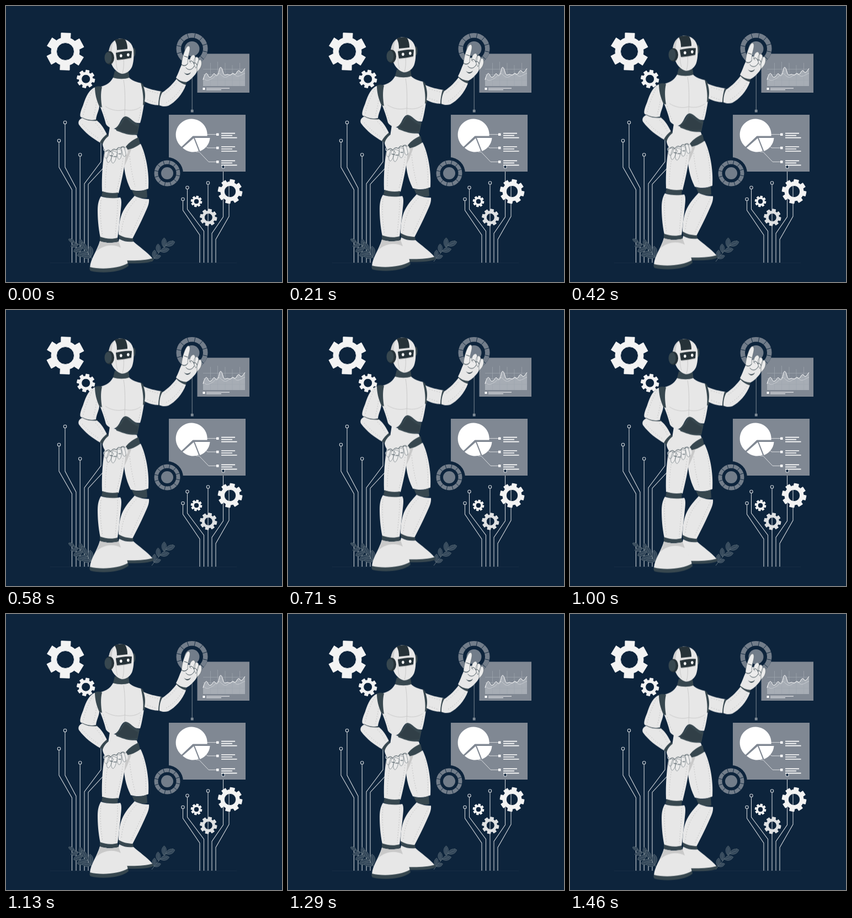
An HTML page for the animation above (1.5 s loop, 500x500 px).

```html
<!DOCTYPE html>
<html lang="en">
<head>
<meta charset="utf-8">
<title>Robot</title>
<style>
html, body { margin: 0; width: 100%; height: 100%; overflow: hidden; background: #0d243c; }
svg { display: block; width: 100vw; height: 100vh; }
#robot { animation: float 1.5s linear infinite; }
@keyframes float { 50% { transform: translateY(-10px); } }
.wire { fill: none; stroke: #cdd2d7; stroke-width: 1.1; }
.node { fill: #0d243c; stroke: #cdd2d7; stroke-width: 1.1; }
.panel { fill: #808893; }
.white { fill: #fff; }
.thin { fill: none; stroke: #fff; stroke-width: .7; }
.body { fill: #e7e7e7; }
.shade { fill: #c9c9c9; }
.dark { fill: #37474f; }
.deep { fill: #263238; }
.seam { fill: none; stroke: #bdbdbd; stroke-width: .7; }
.dots { fill: none; stroke: #b3b3b3; stroke-width: .8; stroke-dasharray: 1.6 3; }
.crease { fill: none; stroke: #37474f; stroke-width: 1; stroke-linecap: round; }
.finger { fill: #ececec; stroke: #56646b; stroke-width: .6; stroke-linejoin: round; }
.leaf { fill: #33475a; stroke: #65757f; stroke-width: .6; }
.stem { fill: none; stroke: #65757f; stroke-width: .9; }
</style>
</head>
<body>
<svg viewBox="0 0 500 500">
  <path d="M80 465.3H418" stroke="#1b3148" stroke-width=".8"/>

  <g class="wire">
    <path d="M96 244V292L119.5 333V465M107 211V292L127 330V465M134.200 270V465M142 465V322L172 282V236M149 465V323L179.500 290V262"/>
    <path d="M320.500 350V370L351 415V465M328.500 329V368L358.500 408V465M366 320V465M393.500 292V382L373 412V465M404 321V381L380 423V465"/>
  </g>

  <g id="dials-back"></g>
  <path d="M337.200 106V190" stroke="#7f8a95"/>
  <rect x="334.800" y="187.800" width="4.800" height="4.800" fill="#7f8a95"/>

  <rect class="panel" x="346.500" y="86.500" width="94.500" height="70.500"/>
  <g id="chart">
    <path d="M357 134C360 122 363 120 365 124S369 131 372 128S376 120 379 124S384 127 386 117S391 111 393 119S397 125 400 124S406 127 409 123S414 127 417 122S421 115 424 119S429 118 433 113V145H357Z" fill="#a7adb5"/>
    <path d="M357 114.500H433M357 124.500H433M357 134.500H433M370.500 103V145M383.500 101V145M397 103V145M410 107V145M423.500 103V145" stroke="#a0a7af" stroke-width=".7"/>
    <path class="thin" d="M357 134C360 122 363 120 365 124S369 131 372 128S376 120 379 124S384 127 386 117S391 111 393 119S397 125 400 124S406 127 409 123S414 127 417 122S421 115 424 119S429 118 433 113" style="stroke-width:1"/>
    <path class="thin" d="M357 130C364 139 369 133 374 131S382 120 387 123S395 132 401 128S411 122 416 126S426 124 433 122" opacity=".5"/>
    <rect class="white" x="356.500" y="148" width="4" height="4"/>
    <path class="thin" d="M363 149H405M363 151.700H390" style="stroke-width:1.100"/>
  </g>

  <rect class="panel" x="295" y="197" width="139" height="103"/>
  <g id="pie">
    <path class="white" d="M338.500 235.500L318 255A28.500 28.500 0 1 1 364.500 235.500Z"/>
    <path class="white" d="M340 239.500L320 257A28 28 0 0 0 349 262.500Z"/>
    <path class="white" d="M342 239H369.500A28 28 0 0 1 351.500 263Z"/>
    <path class="thin" d="M360 232.700H382M362 254L365 257H382M344 264L350 264.500L367 282.300H382"/>
    <g id="legend"></g>
  </g>
  <circle class="node" cx="393.500" cy="291.500" r="2.700"/>
  <g id="nodes" class="node"></g>
  <g id="dials"></g>
  <g id="gears"></g>
  <g id="plants"></g>

  <g id="robot">
    <!-- far leg -->
    <path class="body" d="M218 258C228 256 237 252 244 250C253 268 260 301 258 331C248 336 236 336 226 333C217 315 212 294 214 270Z"/>
    <path class="shade" d="M212 258L228 256C224 270 219 281 214 291Z"/>
    <path class="dots" d="M224 272C226 294 230 312 234 327M248 266C253 288 254 308 253 326"/>
    <path class="dark" d="M228 334C238 337 248 336 255 332L256 347C248 350 239 347 232 343Z"/>
    <path class="body" d="M233 344C242 349 252 350 259 350C260 358 256 366 251 377C244 393 236 408 229 422C220 422 211 419 204 415C204 398 206 384 212 372C218 360 226 352 233 344Z"/>
    <path class="dots" d="M236 351C221 365 211 386 209 411M254 355C244 376 235 396 226 416"/>
    <path class="dark" d="M204 414C212 419 221 421 230 421L231 427C221 428 212 426 205 421Z"/>
    <path class="body" d="M205 422C214 427 222 428 231 427C241 436 256 446 266 458C253 463 232 464 215 463L201 440Z"/>
    <path class="dark" d="M266 457C268 460 267 462 264 463C251 467 234 467 216 466L214 461C233 462 253 461 266 457Z"/>

    <!-- pelvis and near leg -->
    <path class="body" d="M188 219C201 225 219 231 237 234L242 249C236 259 222 260 216 262L182 258Z"/>
    <path class="dark" d="M217 255C223 247 231 242 240 238L243 250C236 256 226 260 216 261Z"/>
    <path class="body" d="M181 250C191 259 207 262 217 260C217 282 211 312 204 339C193 341 183 339 174 336C173 310 175 278 181 250Z"/>
    <path class="dots" d="M185 277C181 298 180 314 180 330M212 276C209 300 205 319 201 333"/>
    <path class="dark" d="M175 336C184 339 194 340 203 338L202 349C192 350 181 348 173 344Z"/>
    <path class="body" d="M172 345C183 349 197 349 207 347C211 352 208 366 207 379C205 395 204 408 202 421C191 424 181 423 171 420C167 401 166 383 166 370C166 359 168 351 172 345Z"/>
    <path class="dots" d="M202 352C203 373 199 397 198 417M172 352C170 374 172 397 175 416"/>
    <path class="dark" d="M170 418C181 422 192 423 202 420L204 427C192 430 180 429 170 426Z"/>
    <path class="body" d="M170 426C181 430 193 430 204 427C208 440 219 454 221 468C202 480 168 480 152 474C153 458 165 444 170 426Z"/>
    <path class="shade" d="M170 426C181 430 193 430 204 427L208 438C192 430 176 434 163 445C167 438 169 432 170 426Z"/>
    <path class="dark" d="M152 473C172 478 204 476 221 466L222 471C206 484 171 485 153 480C151 478 151 475 152 473Z"/>

    <!-- torso -->
    <path class="dark" d="M198 220C207 216 210 202 217 199C225 202 230 211 242 214L238 233C224 236 211 230 200 226Z"/>
    <path class="deep" d="M201 222C211 216 212 206 217 203C224 209 230 215 239 219L238 229C225 233 212 229 201 222Z" opacity=".35"/>
    <path class="dark" d="M197 118H222L224 133C214 137 202 137 193 134Z"/>
    <path class="body" d="M194 130C204 133 215 133 223 130C229 136 237 138 245 140C248 154 252 169 249 184C247 196 245 206 243 212C230 214 227 201 216 200C207 203 207 217 197 222C191 223 184 219 181 214C178 202 174 191 170 181C166 169 165 157 166 147C178 146 188 141 194 130Z"/>
    <path class="seam" d="M213 134C216 151 216 172 215 199M180 182C192 190 205 191 215 188C227 191 237 188 244 183"/>
    <path class="dots" d="M176 187C179 198 182 207 186 214M244 188C243 198 241 205 239 209"/>

    <!-- head -->
    <ellipse class="dark" cx="231.500" cy="84" rx="3" ry="8"/>
    <path class="body" d="M186 84C188 67 197 59.500 208 59.500C221 60 229 68 231 80C232 94 231 103 228 111C224 119 217 123 210 123C201 121 194 113 191 105Z"/>
    <path class="shade" d="M186 84C188 67 197 59.500 208 59.500L197 63C191 69 191 80 194 106L191 105Z" opacity=".8"/>
    <path class="deep" d="M197 62C203 59 211 59 216 61C219 66 220 72 220 78L201 80C201 73 200 67 197 62Z"/>
    <path class="seam" d="M201 81C198 90 199 107 202 116M213 97C214 106 213 115 211 122M202 99L227 95"/>
    <path class="deep" d="M199 85C208 83 218 81 228 82L227 94C219 96 210 97 201 98Z"/>
    <ellipse class="white" cx="208.300" cy="90.300" rx="2.300" ry="2.800"/>
    <ellipse class="white" cx="221.300" cy="88.600" rx="2.300" ry="2.800"/>
    <ellipse class="deep" cx="187.500" cy="94" rx="8.500" ry="12"/>
    <ellipse class="dark" cx="185" cy="94" rx="6.500" ry="10.500"/>

    <!-- lowered arm -->
    <path class="body" d="M163 147C151 150 145 164 140 179C136 189 133 197 135 201C144 207 154 208 163 206C164 195 170 188 169 178C165 165 163 156 163 147Z"/>
    <path class="dots" d="M157 153C149 168 143 184 140 198M164 174C162 187 160 195 158 202"/>
    <path class="dark" d="M161 147C165 145 170 145 174 147C171 158 172 172 174 184L169 182C164 171 161 159 161 147Z"/>
    <path class="dark" d="M138 202C147 207 157 208 165 206L166 210L138 206Z"/>
    <path class="body" d="M138 203C147 208 157 209 165 208C173 214 178 223 183 233C178 237 174 242 171 248C157 240 143 230 132 215C130 210 132 206 138 203Z"/>
    <path class="dots" d="M138 214C148 225 157 233 168 240M162 212C169 219 174 227 177 234"/>
    <path class="dark" d="M170 247C173 241 178 236 183 232L186 236C181 240 177 245 175 251Z"/>
    <path class="body" d="M175 251C177 244 181 239 187 235C197 239 207 246 214 253C223 259 222 267 218 270L190 271C181 266 176 259 175 251Z"/>
    <path class="finger" d="M181 262C176 269 178 276 182 276C186 274 186 268 188 265ZM187 263C182 271 181 282 185 284C190 282 191 273 195 268ZM194 262C190 270 189 284 194 285C199 282 199 274 202 266ZM202 259C201 268 201 277 205 278C210 276 209 268 209 261ZM208 255C211 263 210 272 215 273C219 271 216 263 214 257Z"/>
    <path class="crease" d="M181 264Q185 258 190 264Q194 257 200 261Q203 254 208 258Q211 252 216 257M188 271L193 272M195 273L200 273M204 268L208 268"/>

    <!-- raised arm -->
    <path class="dark" d="M244 139C249 142 250 145 250 147C254 157 254 167 252 177L248 180C250 165 247 151 244 139Z"/>
    <path class="body" d="M249 146C260 151 270 153 282 155C279 164 277 173 278 180C267 180 258 177 251 173C253 163 252 154 249 146Z"/>
    <path class="dots" d="M256 153L277 159M256 170L273 176"/>
    <path class="dark" d="M280 155L285 156C281 164 279 173 280 181L276 180C276 171 278 162 280 155Z"/>
    <path class="body" d="M283 157C295 149 303 140 310 131C315 137 320 140 326 143C320 160 306 175 294 181C288 183 282 182 278 180C278 172 279 164 283 157Z"/>
    <path class="dots" d="M287 160C297 153 304 146 310 138M320 145C311 160 301 169 289 176"/>
    <path class="dark" d="M308 131L311 127C316 133 321 136 327 138L326 143C319 141 312 137 308 131Z"/>
    <path class="body" d="M308 130C312 123 314 115 318 107C318 102 321 99 325 97L343 96C350 104 349 116 343 124C338 130 333 135 327 138C320 138 313 135 308 130Z"/>
    <path class="finger" d="M318 106C319 94 324 77 329 73C334 71 334 78 332 85C330 92 329 99 329 105C326 109 320 110 318 106Z"/>
    <path class="finger" d="M333 101C332 94 337 87 341 89C345 93 342 102 340 109ZM340 104C340 95 344 90 348 94C351 98 347 108 344 113ZM346 107C347 98 352 95 354 100C356 108 351 116 346 119Z"/>
    <path class="finger" d="M328 106C334 101 342 105 341 110C339 116 331 118 326 114Z" style="stroke:none"/>
    <path class="crease" d="M318 106Q323 111 329 105M323 91L329 93M326 112C330 117 337 117 341 109"/>
    <path class="dark" d="M322 120C325 124 331 124 335 120C333 125 327 128 322 120Z"/>
    <path class="crease" d="M333 101Q337 97 340 104Q343 101 346 107"/>
  </g>
</svg>
<script>
const $ = id => document.getElementById(id);
const BG = '#0d243c';

function polar(r, a) {
  return `${(r * Math.cos(a)).toFixed(2)} ${(r * Math.sin(a)).toFixed(2)}`;
}

function gear(x, y, R, body, hole, n, turn, fill) {
  const step = Math.PI * 2 / n;
  let d = '';
  for (let i = 0; i < n; i++) {
    const a = turn + i * step;
    d += `${i ? 'L' : 'M'}${polar(body, a - step * .32)}L${polar(R, a - step * .24)}` +
      `L${polar(R, a + step * .24)}L${polar(body, a + step * .32)}` +
      `A${body} ${body} 0 0 1 ${polar(body, a + step * .68)}`;
  }
  d += `ZM${hole} 0A${hole} ${hole} 0 1 0 ${-hole} 0A${hole} ${hole} 0 1 0 ${hole} 0Z`;
  return `<path transform="translate(${x} ${y})" d="${d}" fill="${fill}" fill-rule="evenodd"
    stroke="${fill}" stroke-linejoin="round"/>`;
}

function dial(x, y, outer, inner, core, halo) {
  const mid = (outer + inner) / 2;
  let ticks = '';
  for (let i = 0; i < 12; i++) {
    const a = (i + .4) * Math.PI / 6;
    ticks += `M${polar(inner, a)}L${polar(outer, a)}`;
  }
  return `<g transform="translate(${x} ${y})"><circle r="${halo}" fill="${BG}"/>
    <circle r="${mid}" fill="none" stroke="#727d8a" stroke-width="${outer - inner}"/>
    <path d="${ticks}" stroke="${BG}" stroke-width=".9"/>
    <circle r="${core}" fill="#727d8a"/></g>`;
}

function leaf(x, y, turn, len) {
  const w = len * .32;
  return `<g transform="translate(${x} ${y}) rotate(${turn})">
    <path class="leaf" d="M0 0C${len * .3} ${-w} ${len * .75} ${-w} ${len} 0C${len * .75} ${w} ${len * .3} ${w} 0 0Z"/>
    <path class="stem" d="M0 0H${len * .8}" style="stroke-width:.5"/></g>`;
}

$('gears').innerHTML =
  gear(107.5, 82.5, 34.5, 25.5, 16, 6, -1.54, '#f3f3f3') +
  gear(144.7, 132.2, 16.3, 12.3, 8, 8, .2, '#f3f3f3') +
  gear(406, 336, 22, 17, 10.7, 8, .2, '#f3f3f3') +
  gear(345, 354, 10, 7.3, 4.8, 8, .2, '#f3f3f3') +
  gear(366.8, 383, 15.3, 11.6, 7.5, 8, .2, '#dfe1e3');

$('dials').innerHTML =
  dial(337, 77.5, 28.5, 20, 13.5, 28.5) +
  dial(292, 303, 23.5, 16.5, 11, 29);

$('nodes').innerHTML = [[96, 244], [107, 211], [134.2, 269.5], [179.5, 259.5],
  [320.5, 350], [328.5, 329], [366, 320.5], [404, 321]]
  .map(([x, y]) => `<circle cx="${x}" cy="${y}" r="2.700"/>`).join('');

$('legend').innerHTML = [232.7, 257, 282.3].map(y =>
  `<rect class="white" x="381" y="${y - 2.2}" width="4.500" height="4.500"/>
   <path d="M390 ${y - 2}H415M390 ${y + 2}H410M390 ${y + 6}H418.500" stroke="#fff" stroke-width="1.700"/>`).join('');

$('plants').innerHTML =
  '<path class="stem" d="M156 459C149 442 136 431 117 426M264 463C275 448 287 435 303 425"/>' +
  [[124, 428, 208, 12], [131, 432, 165, 14], [138, 436, 255, 14], [139, 438, 158, 18],
   [146, 443, 240, 17], [148, 446, 162, 20], [154, 454, 265, 19], [154, 455, 188, 16],
   [289, 434, -22, 18], [286, 437, -88, 17], [279, 444, -12, 17], [276, 447, -92, 16],
   [268, 457, -20, 13], [268, 457, -85, 15]]
  .map(args => leaf(...args)).join('');
</script>
</body>
</html>
```
